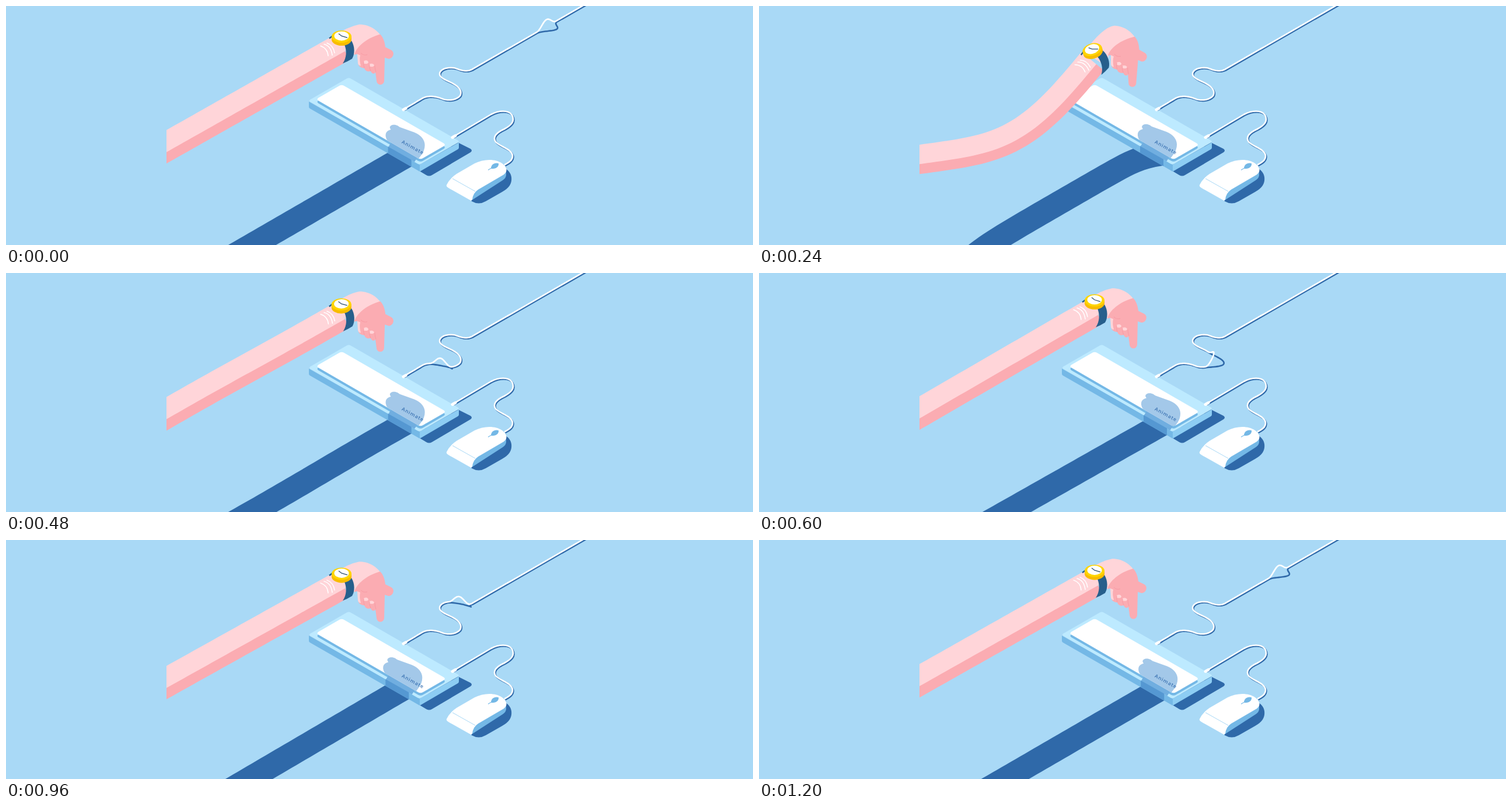
Recreate the animation shown at these times as an HTML page. Size 1280 px wide and 410 px high, loop 1.23 s.

```html
<!DOCTYPE html>
<html lang="en">
<head>
<meta charset="utf-8">
<title>Pressing a key</title>
<style>
  html, body { margin: 0; width: 100%; height: 100%; overflow: hidden; background: #a9d9f6; }
  svg { display: block; width: 100vw; height: 100vh; }
  .ink { fill: #2f69a9; }
  .light { fill: #ffd5d9; }
  .skin { fill: #fbacb2; }
  .side { fill: #74b8e6; }
  .cord { fill: none; stroke: #fff; stroke-width: 2.6; stroke-linecap: round; stroke-linejoin: round; }
  .cord.dark { stroke: #2f69a9; }
  .plug { stroke: #fff; stroke-width: 5; stroke-linecap: round; }
  .crease { fill: none; stroke: #fff; stroke-width: 1.5; stroke-linecap: round; }
  .seam { fill: none; stroke: #a9d9f6; }
  text { font: 600 8.8px "Open Sans", "Noto Sans", sans-serif; letter-spacing: .9px; fill: #3a72b2; }
</style>
</head>
<body>
<svg viewBox="0 0 1280 410" preserveAspectRatio="none">
  <defs>
    <rect id="board" width="220" height="80" rx="4" transform="matrix(.866 .5 .866 -.5 518 162.5)"/>
    <rect id="plate" x="5" y="10" width="207" height="51" rx="5" transform="matrix(.866 .5 .866 -.5 518 162.5)"/>
    <path id="frontSide" d="M519 164 L709 272 V284 L521 176 Q519 175 519 173 Z"/>
    <path id="mouseCord" d="M767 224 L831 186 C844 179 861 178 867 187 C873 198 865 205 854 211 C841 217 833 224 839 233 C847 242 867 245 868 257 C868 265 862 268 855 272"/>
    <clipPath id="stageEdge"><rect x="275" y="0" width="900" height="410"/></clipPath>
    <clipPath id="boardClip"><use href="#board"/></clipPath>
    <clipPath id="plateClip"><use href="#plate"/></clipPath>
    <clipPath id="sideClip"><use href="#frontSide"/></clipPath>
  </defs>
  <rect width="1280" height="410" fill="#a9d9f6"/>
  <path id="armShadow" class="ink"/>

  <g id="keyboard">
    <path class="ink" d="M770 232 L796 245 Q800 248 796 251 L730 290 Q725 293 720 290 L700 278 Z"/>
    <use href="#frontSide" class="side"/>
    <path fill="#8dcdf3" d="M709 272 L776 234 V243 Q776 245 774 246 L709 284 Z"/>
    <use href="#board" fill="#bdeaff"/>
    <use href="#plate" y="4.5" class="side"/>
    <g clip-path="url(#boardClip)"><path class="cast" fill="#70aee0" d="M663 230 L704 254 V262 L695 276 L655 252 V243 Z"/></g>
    <g clip-path="url(#sideClip)"><path class="cast" fill="#5598d2" d="M655 235 L695 260 V290 L655 267 Z"/></g>
    <use href="#plate" fill="#fff"/>
    <g clip-path="url(#plateClip)">
      <path class="cast" fill="#a3c8e9" d="M651 224 C650 215 656 214 660 212 C655 207 661 203 667 204 Q672 205 675 208 L700 217 C712 222 718 230 718 239 Q718 248 712 256 L703 268 L662 238 Q652 232 651 224 Z"/>
    </g>
    <text transform="matrix(.88 .48 -.36 .86 677.5 235)">Animate</text>
  </g>

  <path id="cordShadow" class="cord dark"/>
  <path id="cord" class="cord" d="M682 177 L714 158 C724 153 737 155 747 159 C757 163 771 162 778 154 C783 145 774 137 764 132 C754 127 739 122 744 113 C749 105 764 105 771 107 C781 111 789 113 798 109 L1064 -44"/>
  <path class="plug" d="M681 178 L685 175.700"/>

  <g id="mouse">
    <use href="#mouseCord" class="cord dark" x="1.400" y="1.600"/>
    <use href="#mouseCord" class="cord"/>
    <path class="plug" d="M765 225.500 L770 222.600"/>
    <path class="ink" d="M855 279 C867 284 869 299 863 308 Q859 314 850 319 L822 335 Q810 342 798 335 L796 332 Z"/>
    <path class="side" d="M857 276 V290 Q857 295 851 299 L803 330 L797 334 L804 313 Z"/>
    <path fill="#fff" d="M755 307 Q760 296 772 288 L803 270 C819 262 839 262 850 270 C860 277 860 286 850 291 L809 315 Q800 321 799 332 L797 334 L758 312 Q754 310 755 307 Z"/>
    <path class="seam" d="M765 296 L804 318 M826 281 L833 277"/>
    <path class="side" d="M831 279 C831 272 837 268 844 270 C845 276 839 280 831 279 Z"/>
    <path fill="none" stroke="#74b8e6" d="M826 281.500 L832 278"/>
  </g>

  <g clip-path="url(#stageEdge)">
    <path id="armLight" class="light"/>
    <path id="armDark" class="skin"/>
  </g>
  <path id="handBack" class="light"/>
  <g id="hand">
    <path class="skin" d="M597 83 C600 70 617 55 641 48 C647 54 649 62 650 70 L660 75 C668 80 662 91 655 90 L649 88 L648 128 A6.500 6.500 0 0 1 635 128 L633 113 C632 117 626 116 625 111 C621 113 615 111 614 106 C610 106 605 104 604 100 L602 82 Z"/>
    <path class="light" d="M602 82 L607 84 Q605 92 608 102 Q604 102 603 98 Z M613 94 Q619 91 621 96 Q620 100 613 98 Z M623 99 Q629 97 631 101 Q630 105 623 103 Z"/>
    <path fill="none" stroke="#f79ca5" d="M608 80 Q612 85 619 83 M614 106 Q612 99 613 95 M625 111 Q622 105 623 100 M634 113 Q632 106 632 102"/>
  </g>
  <g id="watch">
    <path class="crease" d="M-30 11 Q-18 14 -16 30 M-36 14 Q-24 18 -23 31 M-25 9 Q-14 13 -12 26"/>
    <path fill="none" stroke="#265f8c" stroke-width="2.500" d="M-21 1 L-14 -4"/>
    <path fill="#265f8c" d="M5 12 L17 5 C23 15 23 28 18 36 Q10 41 2 44 C9 34 9 22 5 12 Z"/>
    <path fill="#f8bc00" d="M-17 -2 V3 A17 10.500 0 0 0 17 3 V-2 Z"/>
    <ellipse cy="-2" rx="17" ry="10.500" fill="#ffd400"/>
    <ellipse cy="-3" rx="12.500" ry="8" fill="#fff"/>
    <path fill="none" stroke="#2d4f70" stroke-width="1.300" d="M-5 -7 L0 -3 L10 0"/>
  </g>
</svg>
<script>
const LOOP = 1230, STEP = 30;
const el = id => document.getElementById(id);
const set = (id, name, value) => el(id).setAttribute(name, value);
const toPath = pts => 'M' + pts.map(([x, y]) => x.toFixed(2) + ' ' + y.toFixed(2)).join('L');
const wave = (u, n) => Math.sin(n * Math.PI * u);

// Smooth swell around a moment of the loop.
function swell(t, center, width) {
  const away = (t - center + 1.5 * LOOP) % LOOP - LOOP / 2;
  return Math.exp(-((away / width) ** 2));
}

// How far each part of the arm is below its rest position.
function poseAt(t) {
  const rebound = swell(t, 580, 60);
  const settle = 7 * swell(t, 860, 240) - 8 * rebound - 3 * swell(t, 100, 60);
  return {
    hand: 52 * swell(t, 345, 60) + settle,
    wrist: 52 * swell(t, 320, 88) + settle,
    base: 12 * swell(t, 235, 60) - 7 * swell(t, 370, 50) + 8 * swell(t, 770, 190) - 5 * rebound,
    sag: 55 * swell(t, 240, 60) - 9 * swell(t, 370, 60),
    swing: -9 * swell(t, 300, 110)
  };
}
const dropAt = (pose, end, u) =>
  pose.base * (1 - u) + end * u + pose.sag * wave(u, 1) + pose.swing * wave(u, 2);
// The cast shadow slides along the keyboard, less and less as the arm comes down.
const slide = drop => -19 * Math.tanh(drop / 20);

// Band along a curve between two sideways distances.
function ribbon(curve, from, to) {
  const near = [], far = [];
  for (let i = 0; i <= 40; i++) {
    const u = i / 40, [x, y] = curve(u), a = curve(u - .01), b = curve(u + .01);
    const len = Math.hypot(b[0] - a[0], b[1] - a[1]);
    const nx = (a[1] - b[1]) / len, ny = (b[0] - a[0]) / len;
    near.push([x + nx * from, y + ny * from]);
    far.unshift([x + nx * to, y + ny * to]);
  }
  return toPath([...near, ...far]) + 'Z';
}

function mover(cx, cy, x, y, deg) {
  const c = Math.cos(deg * Math.PI / 180), s = Math.sin(deg * Math.PI / 180);
  return (px, py) => {
    const dx = px - cx, dy = py - cy;
    return (x + dx * c - dy * s).toFixed(2) + ' ' + (y + dx * s + dy * c).toFixed(2) + ' ';
  };
}

function drawArm(t) {
  const pose = poseAt(t), lag = pose.wrist - pose.hand;
  const wx = 575 - .17 * lag, wy = 54 + pose.wrist, tilt = -.85 * lag;
  const hx = .15 * lag, hy = pose.hand, turn = .16 * lag;

  const arm = u => [255 + (326 - .15 * lag) * u, 262 - 185 * u + dropAt(pose, pose.wrist, u)];
  set('armLight', 'd', ribbon(arm, -33, 1));
  set('armDark', 'd', ribbon(arm, 0, 17));

  const shadow = u => {
    const k = slide(dropAt(pose, pose.hand, u));
    return [370 + 320 * u + .866 * k, 440 - 185 * u + .5 * k];
  };
  set('armShadow', 'd', ribbon(shadow, -20.5, 20.5));
  const k = slide(pose.hand);
  document.querySelectorAll('.cast').forEach(n => n.setAttribute('transform', `translate(${.866 * k} ${.5 * k})`));

  const H = mover(605, 45, 605 + hx, 45 + hy, turn), W = mover(0, 0, wx, wy, tilt);
  set('handBack', 'd',
    'M' + W(-14, -2) + 'Q' + H(585, 35) + H(605, 31.3) +
    'C' + H(623, 31) + H(640, 41) + H(648, 61) + 'L' + H(641, 66) +
    'L' + H(608, 76) + 'L' + H(598, 82) + 'L' + W(17, 30) + 'L' + W(6, 22) + 'Z');
  set('hand', 'transform', `translate(${hx} ${hy}) rotate(${turn} 605 45)`);
  set('watch', 'transform', `translate(${wx} ${wy}) rotate(${tilt})`);
}

// Keyboard cord, sampled once along its length.
const GAP = 1.5, cordPoints = [];
for (let s = 0, len = el('cord').getTotalLength(); s <= len; s += GAP) {
  const p = el('cord').getPointAtLength(s);
  cordPoints.push([p.x, p.y]);
}

// A key press sends a hump along the cord: it slows down, then shoots away.
function drawCord(t) {
  const age = (t < 300 ? t + LOOP : t) - 340;
  const center = 17 + .4 * age - .00019 * age ** 2 + 147 * Math.exp((age - 890) / 95);
  const strength = Math.min(1, Math.max(0, (age + 30) / 40));
  const lift = cordPoints.map((p, i) => {
    const d = (i * GAP - center) / 19;
    return Math.abs(d) < 1 ? strength * (1 + Math.cos(Math.PI * d)) / 2 : 0;
  });
  const shifted = (dx, dy, sx, sy) => toPath(cordPoints.map(([x, y], i) => [x + dx + sx * lift[i], y + dy + sy * lift[i]]));
  set('cord', 'd', shifted(0, 0, 0, -12));
  set('cordShadow', 'd', shifted(1.4, 1.6, 16, 3));
}

const start = performance.now();
function tick() {
  const t = Math.floor((performance.now() - start) % LOOP / STEP) * STEP;
  drawArm(t);
  drawCord(t);
  requestAnimationFrame(tick);
}
tick();
</script>
</body>
</html>
```
